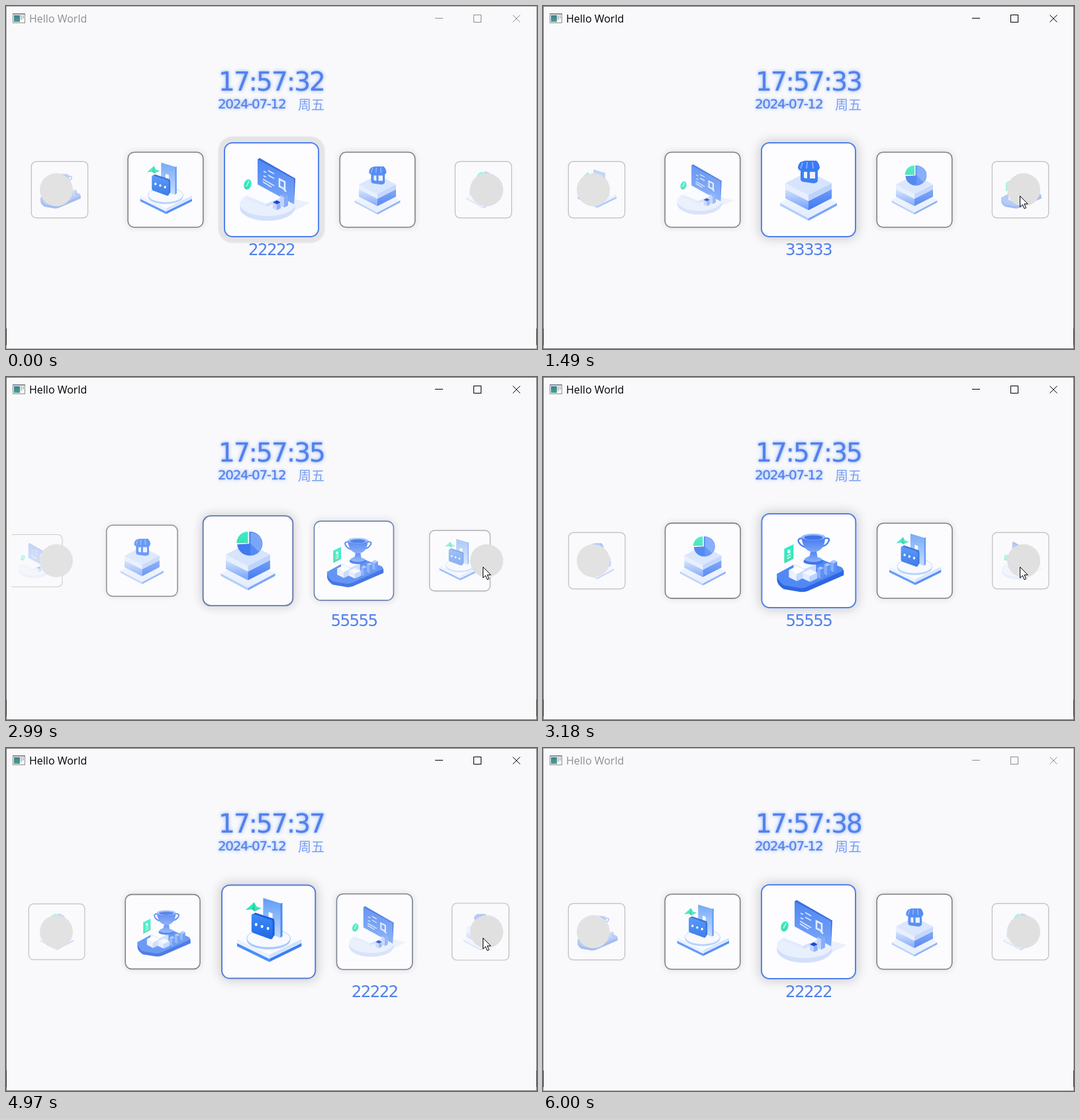
These frames come from a looping animation (802x519 px, 6020 ms). An HTML page:

```html
<!DOCTYPE html>
<html lang="en">
<head>
<meta charset="utf-8">
<title>Hello World</title>
<style>
html, body { margin: 0; width: 100%; height: 100%; overflow: hidden; }
#win { position: relative; width: 802px; height: 519px; overflow: hidden; background: #f9f9fb; --ink: #000; --edge: #707070; }
#win.idle { --ink: #8f8f8f; --edge: #a9a9a9; }
#win > * { position: absolute; white-space: nowrap; }
#frame { inset: 0; pointer-events: none; }
#title { left: 35px; top: 8px; font: 16px/22px "Open Sans", sans-serif; color: var(--ink); }
.num { font-family: "DejaVu Sans", sans-serif; line-height: 1.164; color: #5281ec; }
.glow { text-shadow: 0 0 2px #86a9f6, 0 0 5px #a9c2fa, 0 0 8px #d3e0fd; }
#clock { left: 321px; top: 92px; font-size: 39px; letter-spacing: -1.9px; }
#date { left: 320px; top: 137px; font-size: 20px; letter-spacing: -1.4px; }
#day { left: 441px; top: 134px; font: 300 20px/29px "Noto Sans CJK SC", "Noto Sans CJK", sans-serif; color: #7b9ff2; text-shadow: 0 0 5px #dbe6fd; }
#label { left: 0; top: 355px; font-size: 24.5px; letter-spacing: -1.6px; }
#view { left: 9px; top: 180px; width: 784px; height: 200px; overflow: hidden; isolation: isolate; }
.card { position: absolute; left: 320px; top: 26px; width: 144px; height: 144px; box-sizing: border-box; border: 2px solid; border-radius: 13px; background: #fdfdff; }
.card svg { position: absolute; left: -2px; top: -2px; width: 144px; height: 144px; }
.btn { top: 253px; width: 50px; height: 50px; border-radius: 50%; background: #e2e2e2; }
#cursor { left: 0; top: 0; overflow: visible; }
</style>
</head>
<body>
<div id="win">
  <svg width="0" height="0">
    <defs id="defs"></defs>
  </svg>
  <div id="view"></div>
  <div id="title">Hello World</div>
  <div id="clock" class="num glow"></div>
  <div id="date" class="num glow">2024-07-12</div>
  <div id="day" lang="zh">周五</div>
  <div id="label" class="num"></div>
  <div class="btn" style="left:51px"></div>
  <div class="btn" id="next" style="left:701px"></div>
  <svg id="frame" width="802" height="519" fill="none">
    <g stroke="none">
      <rect x="10" y="11" width="19" height="15" fill="#8b9298"/>
      <rect x="11" y="13" width="17" height="12" fill="#f4f6f7"/>
      <rect x="12" y="14" width="9" height="10" fill="url(#teal)"/>
      <path d="M22 14h2v7h-2zM25 14h2v5h-2z" fill="#b9c3c6"/>
    </g>
    <g style="stroke:var(--ink)">
      <path d="M648 18.5h12M765.5 13.5l11 11M776.5 13.5l-11 11"/>
      <rect x="706.5" y="13.5" width="11" height="11"/>
    </g>
    <rect x=".5" y=".5" width="801" height="518" style="stroke:var(--edge)"/>
    <path d="M.5 488v25M801.5 488v25" stroke="#333"/>
  </svg>
  <svg id="cursor" width="14" height="22">
    <path d="M.5 .5v16.5l3.8-3.6 2.7 6.2 2.6-1.1-2.7-6.1h5.2z" fill="#fff" stroke="#000"/>
  </svg>
</div>
<script>
const LOOP = 6020, MOVE = 300, GAP = 160;
const STARTS = [1190, 1900, 2891, 3758, 4936];
const PRESSES = [1040, 1770, 2670, 3650, 4870];
const ACTIVE = [940, 6000];
const TRAIL = [[190, 260, 508], [420, 500, 420], [690, 720, 287], [5240, 720, 287],
               [5430, 460, 503], [5670, 191, 519]];
const GRAY = [108, 108, 108], BLUE = [82, 129, 238];
const $ = id => document.getElementById(id);

// gradients: id, top colour, bottom colour
const gradient = ([id, a, b]) =>
  `<linearGradient id="${id}" x2="0" y2="1"><stop stop-color="${a}"/><stop offset="1" stop-color="${b}"/></linearGradient>`;
$('defs').innerHTML = [
  ['teal', '#3f7f9c', '#4fa07f'], ['left', '#d3e2fe', '#6f9ff9'], ['right', '#6f9cf8', '#3f78f0'],
  ['door', '#5f9cf8', '#bfd9fe'], ['screen', '#4f86f2', '#7ba7f9'], ['mint', '#2ff0cc', '#3fdcae'],
  ['cup', '#4278ee', '#7da6f9'], ['slab', '#f6f9ff', '#e3ecfd'], ['chat', '#3f8bf8', '#1f68e6']
].map(gradient).join('');

const poly = (points, fill, more = '') => `<polygon points="${points}" fill="${fill}" ${more}/>`;
const oval = (x, y, rx, ry, fill, more = '') =>
  `<ellipse cx="${x}" cy="${y}" rx="${rx}" ry="${ry}" fill="${fill}" ${more}/>`;
const path = (d, fill, more = '') => `<path d="${d}" fill="${fill}" ${more}/>`;

// isometric block: top diamond centre, half sizes, height, three faces
const block = (x, y, w, h, z, top, left, right) =>
  poly([x - w, y, x, y + h, x, y + h + z, x - w, y + z], left) +
  poly([x + w, y, x, y + h, x, y + h + z, x + w, y + z], right) +
  poly([x - w, y, x, y - h, x + w, y, x, y + h], top);

const pedestal = block(0, 20, 43, 23, 4, 'url(#slab)', '#b3cdfc', '#7ba6f9') +
  block(0, -1, 35, 18, 14, '#d9e6fe', 'url(#left)', 'url(#right)') +
  block(0, -10, 35, 18, 9, '#d6e4fe', '#e6effe', '#bcd3fd');

const phone =
  block(1, 17, 49, 24, 5, '#fff', '#4b8ff9', '#3a7ef3') +
  block(1, 11, 49, 24, 6, '#fbfcff', '#eaf1ff', '#d3e3fe') +
  oval(0, 13, 33, 14, '#a9cbfd') + oval(0, 10, 33, 14, '#f7faff', 'stroke="#a9cbfd"') +
  poly([-8, -51, 18, -43, 21, -44, 21, 7, 18, 9, -8, -1], '#4c8cf3') +
  poly([-8, -51, 18, -43, 18, 9, -8, -1], 'url(#door)') +
  poly([0, -30, 6, -28, 6, -18, 10, -17, 3, -9, -5, -21, 0, -20], '#fff') +
  path('M-24 -27l4 -2l27 9q2 1 2 4v21l-4 6z', '#1d5fda') +
  path('M-23 -27l26 9q3 1 3 4v22q0 4 -4 3l-25 -9q-3 -1 -3 -4v-22q0 -4 3 -3z', 'url(#chat)') +
  [0, 1, 2].map(i => oval(-19 + i * 9, -11 + i * 3, 2, 2.4, '#fff')).join('') +
  poly([-35, -33, -22, -45, -18, -38, -11, -36, -21, -31, -25, -34], 'url(#mint)') +
  poly([-22, -45, -25, -34, -21, -31], '#25c8a0');

const monitor =
  poly([0, 6, 59, 20, 34, 32, -10, 44], '#eaf0fd') +
  oval(-6, 27, 42, 20, '#d3e0fb') + oval(-6, 21, 42, 19, '#e9f0fd') +
  block(-8, 9, 30, 12, 5, '#fafcff', '#e3ebfc', '#d4e1fb') +
  poly([-21, -46, -18, -48, 36, -17, 34, 22], '#3a6fdf') +
  poly([-21, -46, 34, -16, 34, 22, -21, -8], 'url(#screen)') +
  path('M-12 -28l4 2M-5 -29l9 5M-12 -21l4 2M-5 -22l9 5M-13 -16l17 10M-13 -12l13 8', 'none', 'stroke="#dbe7ff" stroke-width="1.6"') +
  path('M12 -16l8 4v11l-8 -4zM17 -3l5 6', 'none', 'stroke="#e3edff" stroke-width="2.6"') +
  block(8, 19, 6, 3, 9, '#1c46d2', '#c5d6fd', '#8fb0f8') +
  block(19, 8, 6, 3, 16, '#7fa6f8', '#bfd3fd', '#88acf8') +
  oval(-36, -8, 5.5, 8, 'url(#mint)', 'transform="rotate(18 -36 -8)"') +
  path('M-38 -5l4 -8', 'none', 'stroke="#c9fff0" stroke-width="1.6"');

const shop = pedestal +
  path('M-12 -31h26v18q-3 4 -8 3l-14 -2q-4 -1 -4 -4z', '#3f7ff2') +
  path('M-7 -27h5v10l-5 -1zM2 -27h8v10h-8z', '#eaf2ff') +
  path('M-12 -42l7 -2h17q4 4 5 10q-1 6 -5 5q-4 2 -6 -1q-4 3 -7 0q-4 3 -7 0q-6 3 -8 -3q0 -5 4 -9z', '#397bf3') +
  path('M-9 -41l-3 9M-2 -42l-1 10M6 -42l1 10', 'none', 'stroke="#7dacfb" stroke-width="2"');

const pie = pedestal +
  path('M2 -27v-19a20 19 0 1 1 -19 20z', '#3a76ef') +
  path('M4 -27v-18a18 18 0 0 1 13 31z', '#75a3fa') +
  path('M4 -27l13 13a19 19 0 0 1 -13 6z', '#5088f5') +
  path('M0 -28v-18a18 18 0 0 0 -18 18z', 'url(#mint)');

const trophy =
  path('M-48 20L-1 -5Q4 -8 9 -6L50 11Q53 13 53 17V22L-2 46Q-8 48 -14 47L-38 43Q-48 36 -48 29Z', '#2f66e2') +
  path('M-48 20L-1 -6Q4 -8 9 -6L50 10Q54 14 48 17L-4 40Q-9 42 -15 41L-38 37Q-48 30 -48 20Z', '#5088f5') +
  block(-6, 5, 17, 8, 15, '#fbfdff', '#eef4ff', '#cbdcfd') +
  block(-18, 14, 12, 6, 11, '#fbfdff', '#eaf1ff', '#c6d9fd') +
  block(2, 18, 11, 5, 9, '#f3f8ff', '#e3edff', '#bdd3fd') +
  [0, 1, 2].map(i => block(18 + i * 10, 11 - i * 5, 5, 2.5, 14, '#a9c8fd', '#85aefa', '#5d90f6')).join('') +
  oval(7, 1, 15, 5, '#3f74ea') + oval(7, -2, 13, 4, '#81a9f9') +
  path('M4 -18h7l3 16h-14z', 'url(#cup)') +
  path('M-9 -34q-9 0 -6 6q3 6 11 8M24 -34q9 -1 6 5q-3 6 -11 8', 'none', 'stroke="#4c82f0" stroke-width="2.4"') +
  path('M-11 -36q2 22 18 23q17 -1 18 -23z', 'url(#cup)') +
  oval(7, -36, 18, 5, '#9dbdfb') + oval(7, -35, 14, 3.4, '#3f73e8') +
  poly([-37, -18, -23, -25, -23, -3, -37, 4], 'url(#mint)') +
  path('M-33 -7l6 -3M-33 -3l6 -3', 'none', 'stroke="#d6fff2" stroke-width="1.5"') + oval(-30, -14, 2.4, 3, '#d6fff2');

const cards = [phone, monitor, shop, pie, trophy].map(art => {
  const el = document.createElement('div');
  el.className = 'card';
  el.innerHTML = `<svg viewBox="-72 -72 144 144">${art}</svg>`;
  $('view').append(el);
  return el;
});

const clamp = v => Math.max(0, Math.min(1, v));
const inOutQuad = u => u < .5 ? 2 * u * u : 1 - 2 * (1 - u) * (1 - u);
const mix = (a, b, k) => `rgb(${a.map((v, i) => Math.round(v + (b[i] - v) * k))})`;

function drawCards(t) {
  const moves = STARTS.filter(s => t >= s).length;
  const since = moves ? t - STARTS[moves - 1] : Infinity;
  const pos = moves + inOutQuad(clamp(since / MOVE));
  const current = (1 + moves) % 5, previous = moves % 5;
  const tint = clamp(since / 200);
  cards.forEach((el, i) => {
    const d = ((i - pos + 12.5) % 5) - 2.5;
    const far = Math.abs(d);
    el.style.transform = `translateX(${d * GAP}px) scale(${1 - .2 * far})`;
    el.style.opacity = 1 - .15 * far - .3 * Math.max(0, far - 1);
    el.style.zIndex = Math.round(10 - 4 * far);
    el.style.borderColor = i === current ? mix(GRAY, BLUE, tint) : i === previous ? mix(BLUE, GRAY, tint) : mix(GRAY, GRAY, 0);
    el.style.boxShadow = !moves && i === current
      ? '0 0 2px 8.5px #e4e4e6'
      : `0 0 ${16 - 4 * far}px ${3 - far}px rgba(0,0,0,${Math.max(.06, .17 - .06 * far)})`;
    if (i === current) $('label').style.transform = `translateX(${401 + d * GAP}px) translateX(-50%)`;
  });
  $('label').textContent = String(current + 1).repeat(5);
}

function drawCursor(t) {
  const n = TRAIL.findIndex(k => t < k[0]);
  $('cursor').style.display = n > 0 ? '' : 'none';
  if (n < 1) return;
  const [t0, x0, y0] = TRAIL[n - 1], [t1, x1, y1] = TRAIL[n];
  const u = (t - t0) / (t1 - t0);
  $('cursor').style.transform = `translate(${Math.round(x0 + (x1 - x0) * u)}px,${Math.round(y0 + (y1 - y0) * u)}px)`;
}

function render(t) {
  $('win').className = t >= ACTIVE[0] && t < ACTIVE[1] ? '' : 'idle';
  $('clock').textContent = '17:57:' + (32 + Math.floor((t + 310) / 1000));
  $('next').style.background = PRESSES.some((p, i) => t >= p && t < STARTS[i]) ? '#cfcfcf' : '#e0e0e0';
  drawCards(t);
  drawCursor(t);
}

const begin = performance.now();
function tick() {
  render((performance.now() - begin) % LOOP);
  requestAnimationFrame(tick);
}
tick();
</script>
</body>
</html>
```
